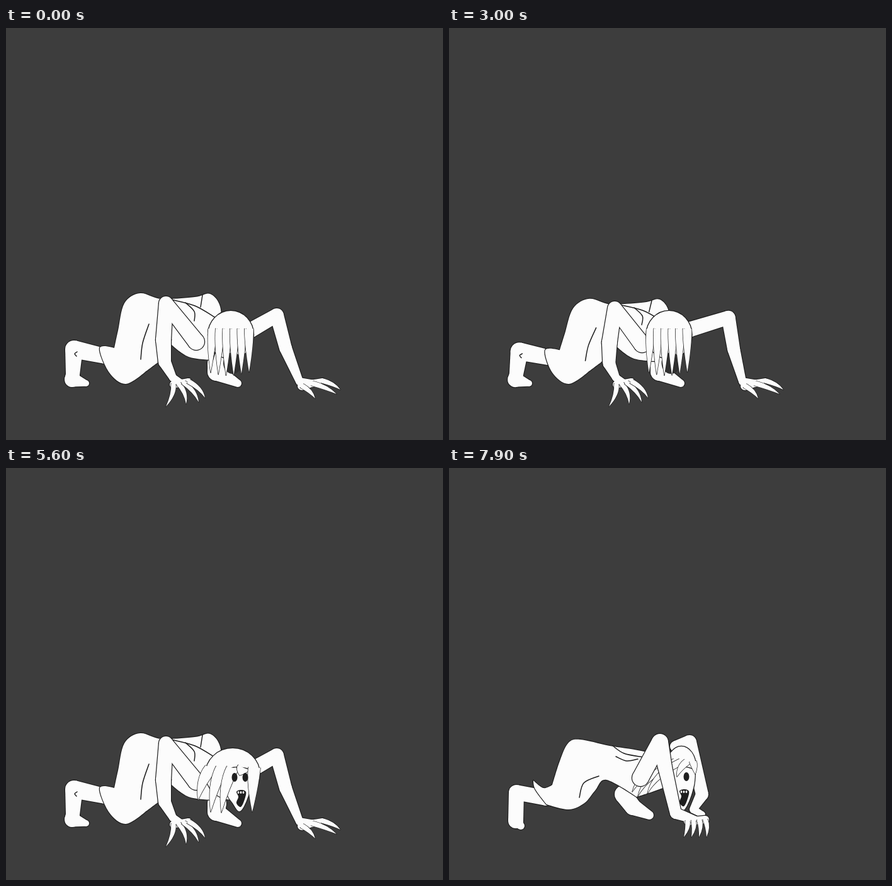
An HTML page with a canvas that plays this animation: 694 px wide and 654 px high, repeating every 8000 ms.

```html
<!DOCTYPE html>
<html lang="en">
<head>
<meta charset="utf-8">
<title>Crawler</title>
<style>
html, body { margin: 0; width: 100%; height: 100%; overflow: hidden; background: #3d3d3d; }
canvas { display: block; }
</style>
</head>
<body>
<canvas id="stage" width="694" height="654"></canvas>
<script>
const ctx = document.getElementById('stage').getContext('2d');
const LOOP = 8000, WHITE = '#fcfcfc', INK = '#1e1e1e';

// The third value of a point is a joint's radius in limbs and a corner flag in outlines.
const pts = text => text.split(' ').map(p => p.split(',').map(Number));
const mix = (a, b, t) => Array.isArray(a) ? a.map((v, i) => mix(v, b[i], t)) : a + (b - a) * t;
const mixAll = (a, b, t) => Object.fromEntries(Object.keys(a).map(k => [k, mix(a[k], b[k], t)]));
const shift = ([x, y, ...rest], dx, dy) => [x + dx, y + dy, ...rest];

// Smooth curve through a few points.
function curve(points, closed = true) {
  const path = new Path2D(), n = points.length;
  const at = i => points[closed ? (i + n) % n : Math.max(0, Math.min(n - 1, i))];
  const handle = (i, sign) => {
    const p = at(i), a = at(i - 1), b = at(i + 1), pull = p[2] ? 0 : sign / 6;
    return [p[0] + pull * (b[0] - a[0]), p[1] + pull * (b[1] - a[1])];
  };
  path.moveTo(...points[0].slice(0, 2));
  for (let i = 0; i < (closed ? n : n - 1); i++)
    path.bezierCurveTo(...handle(i, 1), ...handle(i + 1, -1), ...at(i + 1).slice(0, 2));
  return path;
}

function disc(x, y, rx, ry = rx) {
  const path = new Path2D();
  path.ellipse(x, y, rx, ry, 0, 0, 7);
  return path;
}

// Round joints with tapering bones between them.
function limb(joints) {
  const paths = joints.map(([x, y, r]) => disc(x, y, r));
  joints.slice(1).forEach(([x2, y2, r2], i) => {
    const [x1, y1, r1] = joints[i], d = Math.hypot(x2 - x1, y2 - y1) || 1;
    const nx = (y1 - y2) / d, ny = (x2 - x1) / d, bone = new Path2D();
    bone.moveTo(x1 + nx * r1, y1 + ny * r1);
    bone.lineTo(x2 + nx * r2, y2 + ny * r2);
    bone.lineTo(x2 - nx * r2, y2 - ny * r2);
    bone.lineTo(x1 - nx * r1, y1 - ny * r1);
    bone.closePath();
    paths.push(bone);
  });
  return paths;
}

// Stroking everything before filling merges the pieces into one silhouette.
function solid(...paths) {
  ctx.strokeStyle = INK;
  ctx.lineWidth = 2.4;
  paths.forEach(p => ctx.stroke(p));
  ctx.fillStyle = WHITE;
  paths.forEach(p => ctx.fill(p));
}
function dark(path, color = INK) {
  ctx.fillStyle = color;
  ctx.fill(path);
}
function lines(list) {
  ctx.strokeStyle = INK;
  ctx.lineWidth = 1.5;
  list.forEach(points => ctx.stroke(curve(points, false)));
}

// A finger or lock of hair: wide at the open root, pointed at the tip.
function taper([x, y], [cx, cy], [tx, ty], w) {
  const d = Math.hypot(tx - x, ty - y) || 1, nx = (y - ty) / d * w, ny = (tx - x) / d * w;
  const path = new Path2D();
  path.moveTo(x + nx, y + ny);
  path.quadraticCurveTo(cx + nx, cy + ny, tx, ty);
  path.quadraticCurveTo(cx - nx, cy - ny, x - nx, y - ny);
  ctx.strokeStyle = INK;
  ctx.lineWidth = 1.4;
  ctx.stroke(path);
  dark(path, WHITE);
}

function armWithHand(joints, { palm, tips, bend }) {
  const wrist = joints[joints.length - 1];
  solid(...limb(joints), ...limb([wrist, mix(palm[0], palm[1], .5)]), ...limb(palm));
  tips.forEach((tip, i) => {
    const root = mix(palm[0], palm[1], i / (tips.length - 1));
    taper(root, shift(mix(root, tip, .5), bend, -2), tip, 4);
  });
}

function face([x, y], eyes, size) {
  const mouth = pts('-7,2 0,-1 8,2 6,14 0,26 -7,20 -4,10');
  const place = p => [x + p[0] * size, y + p[1] * size];
  dark(curve(mouth.map(place)));
  for (let i = 0; i < 3; i++) dark(disc(x + (i - 1) * 4 * size, y + 3, 1.4, 2), WHITE);
  eyes.forEach(dx => dark(disc(x + dx, y - 21, 4.5, 7)));
}

function drawHead({ cap: [x, y, rx, ry], tips, mouth, eyes, shade, size = 1 }, dx = 0, dy = 0) {
  ctx.save();
  ctx.translate(dx, dy);
  solid(disc(x, y, rx, ry));
  if (shade) dark(disc(...shade), '#303030');
  if (mouth) solid(curve(pts('-20,-33 13,-33 17,-14 9,16 -2,33 -13,20 -22,3')
    .map(p => shift(p, ...mouth))));
  tips.forEach((tip, i) => {
    const root = [x + rx * (i / (tips.length - 1) * 1.6 - .8), y - ry * .25];
    const bend = [mix(root[0], tip[0], .8), mix(root[1], tip[1], .4)];
    taper(root, bend, tip, rx / tips.length + 1);
  });
  if (mouth) face(mouth, eyes, size);
  ctx.restore();
}

const fringe = (from, to, count) => Array.from({ length: count }, (_, i) =>
  shift(mix(from, to, i / (count - 1)), 0, 4 * Math.sin(i * 7)));

const heads = {
  droop: { cap: [357, 487, 36, 38], tips: fringe([325, 547], [386, 548], 6), shade: [360, 532, 15, 17] },
  hang: { cap: [347, 491, 33, 37], tips: fringe([326, 540], [376, 556], 7) },
  toss: { cap: [362, 472, 37, 32], tips: pts('318,500 345,400 372,377 392,392 402,472'), mouth: [378, 506], eyes: [0], size: .7 },
  shout: { cap: [350, 484, 37, 37], tips: pts('288,524 305,535 322,531 343,526 412,521 418,487'), mouth: [365, 511], eyes: [-7], size: .9 },
  scream: { cap: [360, 486, 43, 41], tips: pts('305,527 325,546 342,547 371,488 391,546'), mouth: [373, 512], eyes: [-10, 7] },
  crawl: { cap: [369, 474, 23, 32], tips: pts('291,514 300,521 315,517 362,490 391,486'), mouth: [373, 511], eyes: [4] }
};

const hands = {
  open: {
    near: { palm: pts('266,566,6 290,561,5'), tips: pts('254,601 286,597 306,594 316,587'), bend: 7 },
    far: { palm: pts('470,568,7 503,560,4'), tips: pts('491,588 525,581 531,574'), bend: 4 }
  },
  claw: {
    near: { palm: pts('263,572,6 290,567,8'), tips: pts('242,588 262,592 276,589 291,587'), bend: 11 },
    far: { palm: pts('467,571,7 504,559,4'), tips: pts('482,579 499,587 508,584'), bend: 6 }
  }
};

const crouch = {
  leg: pts('158,521,12 108,510,14 106,550,11 105,558,12 127,564,5'),
  back: pts('149,508 172,508,1 178,480 188,437 213,421 247,430 300,427 324,422 340,442 340,480 328,527,1 290,522 262,502,1'),
  hem: pts('241,531,1 221,546,1 190,565,0 164,547,0'),
  tuckedHem: pts('243,521,1 212,515,1 186,543,0 164,544,0'),
  creases: ['309,443 312,424', '262,431 300,441 333,460', '285,436 299,450 299,465',
    '227,470 217,500 214,526', '113,514 109,517 112,521'].map(pts),
  nearArm: pts('302,498,13 254,437,11 250,495,12 252,530,10 265,555,6'),
  farArm: pts('388,480,12 430,456,11 444,508,10 466,561,6'),
  foot: pts('335,532,15 334,546,14 368,564,6')
};

// sag moves the upper body and leaves whatever touches the ground in place.
const poses = {
  high: { sag: [0, 0], elbow: [0, 0], tuck: 0 },
  low: { sag: [8, 7], elbow: [11, 3], tuck: 0 },
  tense: { sag: [11, -3], elbow: [-11, 7], tuck: .45 },
  roar: { sag: [8, 7], elbow: [11, 3], tuck: 1 }
};

function drawCrouch({ sag, elbow, tuck }, hand) {
  const sink = p => {
    const k = Math.max(0, Math.min(1, (560 - p[1]) / 135));
    return shift(p, sag[0] * k, sag[1] * k);
  };
  const farArm = crouch.farArm.map((p, i) => shift(p, ...mix([0, 0], elbow, [-.4, 1, .6, 0][i])));
  solid(...limb(crouch.foot));
  armWithHand(farArm, hand.far);
  solid(...limb(crouch.leg.map(sink)));
  solid(curve([...crouch.back.map(sink), ...mix(crouch.hem, crouch.tuckedHem, tuck)]));
  lines(crouch.creases.map(c => c.map(sink)));
  armWithHand(crouch.nearArm.map(sink), hand.near);
}

const drag = {
  farLeg: pts('277,518,14 292,538,13 318,551,7'),
  farArm: pts('360,442,9 382,435,11 402,518,10 388,542,6 402,550,5'),
  leg: pts('155,524,12 107,515,12 106,560,12 114,568,6'),
  arm: pts('304,492,13 335,435,13 343,475,11 360,548,9'),
  tail: [134, 496, 1], splay: 13, head: [0, 0]
};
const lift = {
  farLeg: pts('284,514,13 281,534,13 325,543,6'),
  farArm: pts('360,442,9 374,428,11 368,530,11 370,552,9 402,549,7'),
  leg: pts('150,525,11 106,527,12 113,565,11 139,573,6'),
  arm: pts('303,491,14 350,432,15 380,466,13 428,532,11'),
  tail: [121, 498, 1], splay: -16, head: [3, -5]
};
const reach = {
  ...lift,
  leg: pts('150,525,11 71,528,13 80,567,11 104,574,6'),
  arm: pts('303,491,14 409,424,14 460,470,12 546,560,9'),
  splay: -6
};
const crawlBody = pts('150,508 164,503,1 176,465 189,437 208,431 255,441 305,449 365,465 362,497 298,522,1 250,495 232,512 215,532 190,542 155,534,1 137,510');
const crawlCreases = ['238,489 214,500 207,523', '260,441 278,453 308,459', '265,458 282,465 300,462'].map(pts);

function drawCrawl({ farLeg, farArm, leg, arm, tail, splay, head }) {
  const [x, y] = arm[arm.length - 1];
  solid(...limb(farLeg));
  solid(...limb(farArm));
  solid(...limb(leg));
  solid(curve([tail, ...crawlBody]));
  lines(crawlCreases);
  drawHead(heads.crawl, ...head);
  armWithHand(arm, {
    palm: [[x + splay + 6, y + 13, 6], [x + splay + 34, y + 10, 6]],
    tips: [0, 1, 2, 3].map(i => [x + splay + i * 12, y + 38]),
    bend: 4
  });
}

const BREATH = [0, .35, 1, 1.25, 1, .35];
const PANT = [0, .35, 1, .35];
const CRAWL = [[0, drag], [2, lift], [4, reach], [8, drag]];

function render(time) {
  const step = Math.floor(time / 100);
  const { high, low, tense, roar } = poses;
  ctx.fillStyle = '#3d3d3d';
  ctx.fillRect(0, 0, 694, 654);

  if (time < 3600) {
    const t = BREATH[Math.floor(time / 200) % 6];
    drawCrouch(mixAll(high, low, t), hands.open);
    drawHead(heads.droop, -6 * t);
  } else if (time < 4100) {
    drawCrouch(mixAll(high, tense, step < 37 ? .6 : 1), step < 37 ? hands.open : hands.claw);
    drawHead(heads.hang);
  } else if (time < 4300) {
    drawCrouch(mixAll(tense, roar, (step - 40) / 3), hands.claw);
    drawHead(heads.toss);
  } else if (time < 5000 || time >= 6000 && time < 6300) {
    const t = PANT[(step + 2) % 4];
    drawCrouch(mixAll(roar, tense, t * .15), hands.claw);
    drawHead(heads.shout, 0, t * 2);
  } else if (time < 6000) {
    const t = PANT[step % 4];
    drawCrouch(mixAll(high, low, t), hands.open);
    drawHead(heads.scream, 0, t * 4);
  } else {
    const phase = (step - 63) % 8;
    const i = CRAWL.findIndex(([start]) => start > phase);
    const [from, a] = CRAWL[i - 1], [to, b] = CRAWL[i];
    drawCrawl(mixAll(a, b, (phase - from) / (to - from)));
  }
}

ctx.lineJoin = ctx.lineCap = 'round';
function tick() {
  render(performance.now() % LOOP);
  requestAnimationFrame(tick);
}
tick();
</script>
</body>
</html>
```
